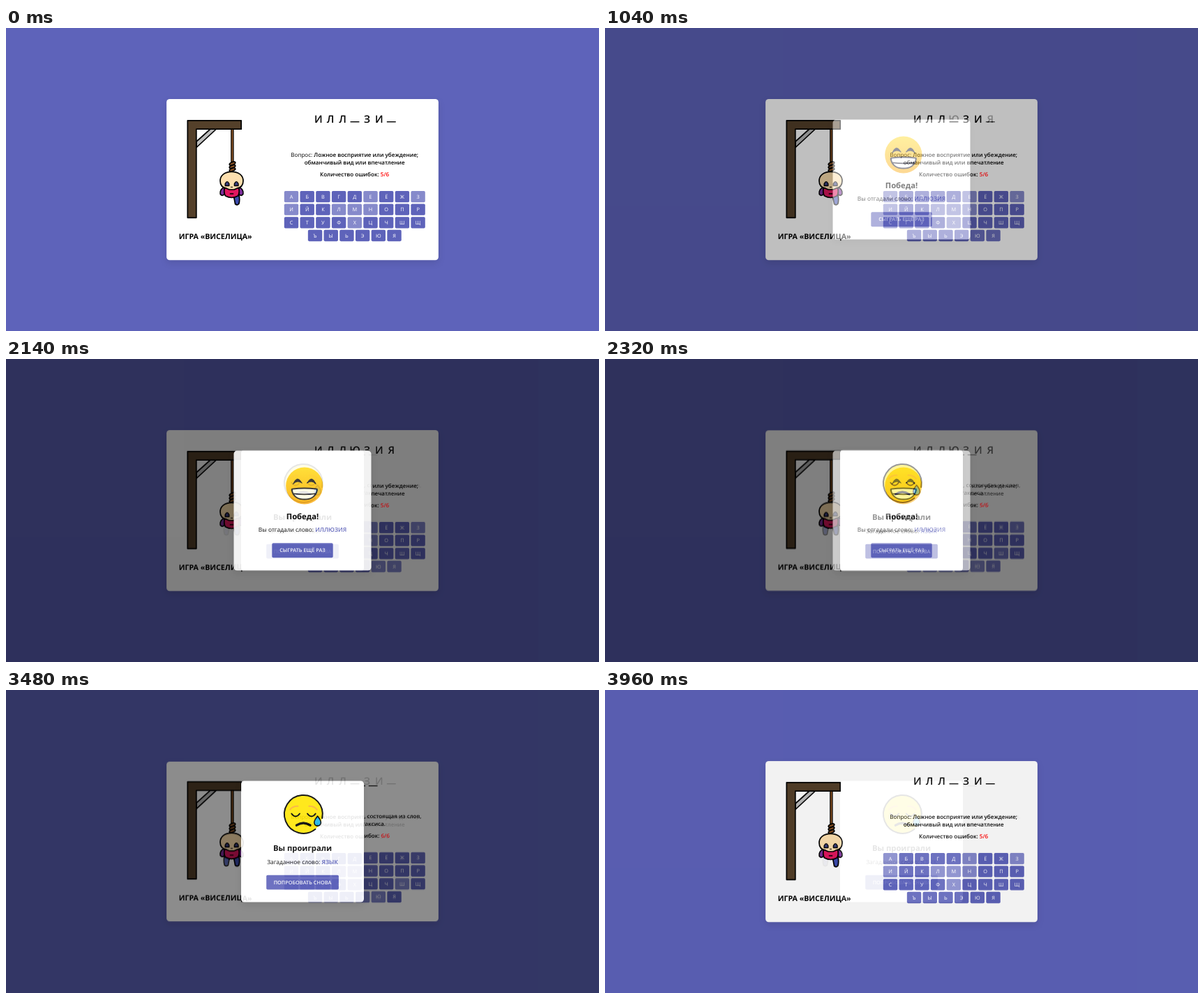
These frames come from a looping animation (850 by 435 pixels, 4020 ms). An HTML page:

```html
<!DOCTYPE html>
<html lang="ru">
<head>
<meta charset="utf-8">
<title>Виселица</title>
<style>
html, body { margin: 0; width: 100%; height: 100%; overflow: hidden; background: #5e63ba; }
svg { position: absolute; left: 0; top: 0; width: 850px; height: 435px; }
text { font-family: "Open Sans", sans-serif; text-anchor: middle; text-rendering: geometricPrecision; }
.panel { fill: #fff; filter: drop-shadow(0 4.6px 4.6px rgba(0, 0, 0, .1)); }
.ink { stroke: #000; stroke-width: 1.7; stroke-linejoin: round; stroke-linecap: round; }
.line { fill: none; stroke: #000; stroke-linecap: round; stroke-linejoin: round; }
.h1 { font-size: 10.64px; font-weight: 700; }
.word { font-size: 14.68px; font-weight: 600; }
.note { font-size: 8.07px; font-weight: 600; }
.note .label { font-weight: 500; }
.key { font-size: 7.34px; fill: #fff; }
.off { opacity: .75; }
.h4 { font-size: 11.23px; font-weight: 700; }
.answer { font-size: 8.44px; font-weight: 500; }
.answer tspan { font-weight: 600; fill: #5e63ba; }
.btn { font-size: 7.34px; font-weight: 600; fill: #fff; }
.end { text-anchor: end; }

#win { opacity: 0; animation: win 4020ms infinite; }
#lose { opacity: 0; animation: lose 4020ms infinite; }
@keyframes win {
  0% { opacity: 0; animation-timing-function: step-end; }
  19.9004% { opacity: 0; animation-timing-function: steps(10, start); }
  34.8258% { opacity: 1; animation-timing-function: step-end; }
  68.1591% { opacity: 0; animation-timing-function: step-end; }
  100% { opacity: 0; }
}
@keyframes lose {
  0% { opacity: 0; animation-timing-function: step-end; }
  53.2337% { opacity: 0; animation-timing-function: steps(10, start); }
  68.1591% { opacity: 1; animation-timing-function: step-end; }
  86.567% { opacity: 1; animation-timing-function: steps(9, start); }
  100% { opacity: .1; }
}
</style>
</head>
<body>
<script>
const PURPLE = '#5e63ba';
const MID = 499.8;

const rect = (x, y, w, h, r, attrs = '') =>
  `<rect x="${x}" y="${y}" width="${w}" height="${h}" rx="${r}" ${attrs}/>`;
const text = (x, y, cls, s, attrs = '') =>
  `<text x="${x}" y="${y}" class="${cls}" ${attrs}>${s}</text>`;
const path = (d, attrs) => `<path d="${d}" ${attrs}/>`;

const ROPE = 'class="ink" fill="#8b5426"';
const LIMB = 'class="ink" fill="#7d2f9c"';
const LEG = 'class="ink" fill="#3c4cae"';

function gallows() {
  const coils = [194.6, 199, 203.4].map(y =>
    `<ellipse cx="324.5" cy="${y}" rx="4.5" ry="2" transform="rotate(-22 324.5 ${y})" ${ROPE}/>`).join('');
  return path('M273 163 293 145H301.5L273 171.5Z', 'class="ink" fill="#bdbdbd"')
    + path('M260.3 132.8H337.2V145.2H272.8V272.3H260.3Z', 'class="ink" fill="#54402a"')
    + rect(322.8, 145.2, 3.2, 47, 0, 'fill="#8b5426" stroke="#000" stroke-width="1.2"')
    + coils;
}

function man(bothLegs) {
  const leg = path('M326 240 334 240Q335.5 247 333.8 252.5Q331.5 255 328.6 252.8Q327.6 247 326 240Z', LEG);
  const otherLeg = path('M321 240 313 240Q311.5 247 313.2 252.5Q315.5 255 318.4 252.8Q319.4 247 321 240Z', LEG);
  const eye = x => path(`M${x - 2.8} 226.5V223.5Q${x} 217.8 ${x + 2.8} 223.5V226.5Z`,
    'fill="#3d4180" stroke="#000" stroke-width="1.4" stroke-linejoin="round"');
  return (bothLegs ? otherLeg : '') + leg
    + path('M312 229Q306 232 307.2 238.5Q309.5 242 312.6 239.2L315 232Z', LIMB)
    + path('M335 229Q341 232 339.8 238.5Q337.5 242 334.4 239.2L332 232Z', LIMB)
    + path('M313.5 229Q311.5 236 314.5 241Q323.5 246 332.5 241Q335.5 236 333.5 229Z', 'class="ink" fill="#e0175f"')
    + path('M321.3 238H325.7', 'class="line" stroke-width="1.3"')
    + path('M323.5 206.3C334 206.3 340 212 340 219.5C340 226 336 229.6 330.5 230.4L327 232H320L316.5 230.4C311 229.6 307 226 307 219.5C307 212 313 206.3 323.5 206.3Z',
      'class="ink" fill="#fddfae"')
    + eye(317) + eye(330.2)
    + path('M322.3 228.4H324.7', 'class="line" stroke-width="1"');
}

function word(letters, lineY) {
  const step = 17.43, x0 = MID + .2 - step * (letters.length - 1) / 2;
  return [...letters].map((c, i) => {
    const x = x0 + i * step;
    return c === '_'
      ? rect(x - 6.42, lineY, 12.85, 1.4, 0)
      : text(x, 135.8, 'word', c);
  }).join('');
}

function keyboard(used) {
  const step = 22.7, w = 20.4;
  return ['АБВГДЕЁЖЗ', 'ИЙКЛМНОПР', 'СТУФХЦЧШЩ', 'ЪЫЬЭЮЯ'].map((row, r) => {
    const y = 233.9 + r * 18.65;
    return [...row].map((c, i) => {
      const x = MID + (i - (row.length - 1) / 2) * step;
      const off = used.includes(c) ? ' class="off"' : '';
      return `<g${off}>${rect(x - w / 2, y, w, 16.3, 1.8, `fill="${PURPLE}"`)}${text(x, y + 10.8, 'key', c)}</g>`;
    }).join('');
  }).join('');
}

const happy = `
  <defs><linearGradient id="sun" x2="0" y2="1">
    <stop offset="0" stop-color="#ffdf3f"/><stop offset="1" stop-color="#fbb127"/>
  </linearGradient></defs>
  <circle cx="427.8" cy="182" r="26.6" fill="url(#sun)"/>`
  + path('M411.5 179.5Q417.5 165.5 424.3 178.2Q417.8 173 411.5 179.5ZM444.3 179.5Q438.3 165.5 431.5 178.2Q438 173 444.3 179.5Z',
    'fill="#2b2a3f" stroke="#2b2a3f" stroke-width="1" stroke-linejoin="round"')
  + path('M410 185.7Q427.8 183.4 445.6 185.7Q447.2 186 446.9 188.5C445 198 438 202.5 427.8 202.5S410.6 198 408.7 188.5Q408.4 186 410 185.7Z', 'fill="#2b2a3f"')
  + path('M411 187.4Q427.8 185.4 444.6 187.4Q444.8 190 443.5 192.4Q427.8 194.6 412.1 192.4Q410.8 190 411 187.4Z', 'fill="#fff"')
  + path('M413.3 194.2Q427.8 196.4 442.3 194.2C439.5 198.7 434.5 200.6 427.8 200.6S416.1 198.7 413.3 194.2Z', 'fill="#fff"');

const sad = '<circle cx="426.3" cy="178.5" r="27.3" fill="#ffe604"/>'
  + path('M453.2 184A27.4 27.4 0 1 0 443.5 199.8', 'class="line" stroke-width="2"')
  + path('M407 171.8Q411 166.6 418.5 166.8M434.3 166.8Q441.8 166.6 445.8 171.8', 'class="line" style="stroke:#f9b233" stroke-width="2"')
  + path('M409.3 177.5Q415 185.5 421 177.5M432 177.5Q438 185.5 443.7 177.5', 'class="line" stroke-width="1.9"')
  + path('M416.5 194.2Q426.3 187.8 436 194.2', 'class="line" stroke-width="3.4"')
  + path('M446.6 181C449.5 184.6 451.4 187.5 451.4 190.3A4.8 4.8 0 0 1 441.8 190.3C441.8 187.5 443.7 184.6 446.6 181Z',
    'fill="#19b4e6" stroke="#000" stroke-width="1.6" stroke-linejoin="round"');

function modal({ x, y, w, h, face, title, label, answer, button, bx, bw, dy }) {
  return rect(x, y, w, h, 4.6, 'class="panel"') + face
    + text(425, 229.9 + dy, 'h4', title)
    + text(425, 248.2 + dy, 'answer', `${label}: <tspan>${answer}</tspan>`)
    + rect(bx, 264.3 + dy, bw, 20.9, 1.8, `fill="${PURPLE}"`)
    + text(425, 277.4 + dy, 'btn', button);
}

function scene({ id, letters, used, question, errors, popup, lost }) {
  const cls = lost ? 'note end' : 'note';
  const [x1, x2, x3] = lost ? [595.5, 544, 550] : [499.7, 499.7, 499.6];
  const shift = body => lost ? `<g transform="translate(0 -1.2)">${body}</g>` : body;
  const card = lost ? [103, 229] : [102, 231.3];
  const red = popup ? '#c00f14' : '#ff0000';
  return `<svg id="${id}" viewBox="0 0 850 435">`
    + rect(0, 0, 850, 435, 0, `fill="${PURPLE}"`)
    + rect(230.1, card[0], 389.8, card[1], 4.6, 'class="panel"')
    + word(letters, lost ? 136.9 : 134)
    + shift(gallows() + man(lost)
      + text(300.2, 302.8, 'h1', 'ИГРА «ВИСЕЛИЦА»')
      + text(x1, 184.9, cls, `<tspan class="label">Вопрос:</tspan> ${question[0]}`)
      + text(x2, 195.9, cls, question[1])
      + keyboard(used))
    + (popup ? rect(0, 0, 850, 435, 0, 'fill-opacity=".5"') : '')
    + shift(text(x3, 213.3, cls, `Количество ошибок: <tspan fill="${red}">${errors}/6</tspan>`))
    + (popup ? modal(popup) : '')
    + '</svg>';
}

const illusion = ['Ложное восприятие или убеждение;', 'обманчивый вид или впечатление'];

document.body.innerHTML = [
  { id: 'play', letters: 'ИЛЛ_ЗИ_', used: 'АЕЗИЛМНХ', question: illusion, errors: 5 },
  {
    id: 'win', letters: 'ИЛЛЮЗИЯ', used: 'АЕЗИЛМНХЮЯ', question: illusion, errors: 5,
    popup: {
      x: 326.5, y: 131.6, w: 197, h: 171.9, dy: 0, face: happy, title: 'Победа!',
      label: 'Вы отгадали слово', answer: 'ИЛЛЮЗИЯ', button: 'СЫГРАТЬ ЕЩЁ РАЗ', bx: 381.3, bw: 87.4
    }
  },
  {
    id: 'lose', letters: '____', used: 'ШЭЮ', errors: 6, lost: true,
    question: ['Система общения, состоящая из слов,', 'грамматики и синтаксиса.'],
    popup: {
      x: 337, y: 130.4, w: 176, h: 174.2, dy: 1.4, face: sad, title: 'Вы проиграли',
      label: 'Загаданное слово', answer: 'ЯЗЫК', button: 'ПОПРОБОВАТЬ СНОВА', bx: 373.2, bw: 103.7
    }
  }
].map(scene).join('');
</script>
</body>
</html>
```
